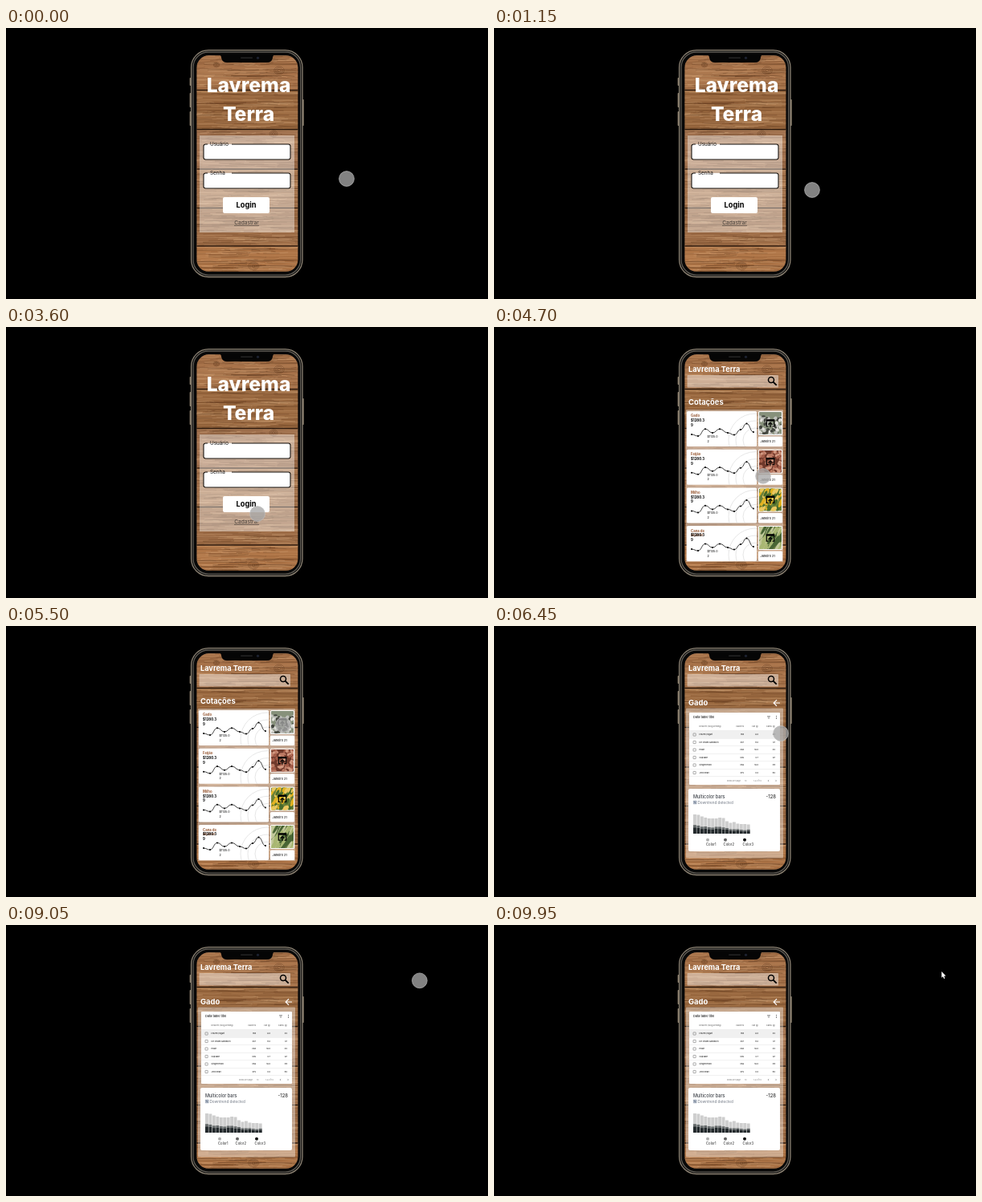
An HTML page with a canvas for the animation above (10 s loop, 600 by 338 pixels).

```html
<!DOCTYPE html>
<html lang="pt">
<head>
<meta charset="utf-8">
<title>Lavrema Terra</title>
<style>
html, body { margin: 0; width: 100%; height: 100%; overflow: hidden; background: #000; }
canvas { display: block; width: 100%; height: 100%; }
</style>
</head>
<body>
<canvas id="stage" width="600" height="338"></canvas>
<script>
const W = 600, H = 338, LOOP = 10000;
const LIST_AT = 4000, DETAIL_AT = 5700, ARROW_AT = 9100;
const stage = document.getElementById('stage').getContext('2d');
const FONT = 'Inter, "Open Sans", sans-serif';
let g;

function seeded(seed) {
  return () => (seed = (seed * 16807) % 2147483647) / 2147483647;
}

function layer(draw) {
  const canvas = document.createElement('canvas');
  canvas.width = W;
  canvas.height = H;
  g = canvas.getContext('2d');
  draw();
  return canvas;
}

function box(x, y, w, h, r, fill, stroke, line = 1) {
  g.beginPath();
  g.roundRect(x, y, w, h, r);
  if (fill) { g.fillStyle = fill; g.fill(); }
  if (stroke) { g.strokeStyle = stroke; g.lineWidth = line; g.stroke(); }
}

function dot(x, y, r, fill) {
  g.beginPath();
  g.arc(x, y, r, 0, 7);
  g.fillStyle = fill;
  g.fill();
}

function path(points, color, width) {
  g.beginPath();
  points.forEach(([x, y]) => g.lineTo(x, y));
  g.strokeStyle = color;
  g.lineWidth = width;
  g.stroke();
}

function text(str, x, y, size, color = '#000', weight = 400, align = 'left') {
  g.font = `${weight} ${size}px ${FONT}`;
  g.textAlign = align;
  g.fillStyle = color;
  g.fillText(str, x, y);
}

function clipped(x, y, w, h, r, draw) {
  g.save();
  g.beginPath();
  g.roundRect(x, y, w, h, r);
  g.clip();
  draw();
  g.restore();
}

function wood() {
  const rand = seeded(41);
  const seams = [30, 77.5, 126.5, 176, 224.5, 272, 310];
  const tones = ['#a8734a', '#99683f', '#a37350', '#a5744d', '#9c6b45', '#ae7446'];
  tones.forEach((tone, i) => {
    const top = seams[i], h = seams[i + 1] - top;
    g.fillStyle = tone;
    g.fillRect(236, top, 130, h);
    for (let n = 0; n < 150; n++) {
      const y = top + rand() * h, x = 215 + rand() * 125;
      const len = 15 + rand() * 65, bend = (rand() - 0.5) * 5;
      g.beginPath();
      g.moveTo(x, y);
      g.bezierCurveTo(x + len / 3, y + bend, x + len / 1.5, y - bend, x + len, y + bend / 2);
      g.strokeStyle = rand() < 0.48 ? 'rgba(75,40,18,.3)' : 'rgba(232,190,145,.27)';
      g.lineWidth = 0.4 + rand() * 0.8;
      g.stroke();
    }
    g.fillStyle = 'rgba(230,185,135,.3)';
    g.fillRect(236, top + 1, 130, 1);
    g.fillStyle = '#2c190d';
    g.fillRect(236, top - 0.7, 130, 1.4);
  });
  [[340, 53, 5], [262, 46, 3], [308, 297, 5], [333, 132, 4]].forEach(([x, y, r]) => {
    for (let k = 1; k <= 3; k++) {
      g.beginPath();
      g.ellipse(x, y, r * k / 2.4, r * k / 3, 0, 0, 7);
      g.strokeStyle = 'rgba(65,32,12,.4)';
      g.lineWidth = 0.7;
      g.stroke();
    }
  });
}

function phone(content) {
  g.fillStyle = '#000';
  g.fillRect(0, 0, W, H);
  [[228.6, 62, 10], [228.6, 81, 18], [228.6, 104, 18], [368.8, 89, 33]]
    .forEach(([x, y, h]) => box(x, y, 2, h, 0.8, '#857a69'));
  box(230.6, 27.6, 138.4, 282.9, 21.5, '#080808', '#8d8374', 1.3);
  box(233, 30, 133.6, 278.1, 19, null, '#5f5b54', 1.3);
  clipped(237.4, 34.3, 126, 269.5, 15, () => { wood(); content(); });
  g.beginPath();
  g.moveTo(265, 33);
  g.quadraticCurveTo(268, 34, 268, 37);
  g.quadraticCurveTo(269, 43, 275, 43);
  g.lineTo(325, 43);
  g.quadraticCurveTo(331, 43, 332, 37);
  g.quadraticCurveTo(332, 34, 335, 33);
  g.fillStyle = '#050505';
  g.fill();
  box(292, 36.5, 15, 1.6, 0.8, '#252525');
  dot(313.5, 37.3, 1.6, '#1d2230');
}

function field(label, y) {
  box(246, y, 108, 19, 2.5, '#fff', '#17130f', 1.1);
  g.fillStyle = '#fff';
  g.fillRect(251, y - 0.8, 30, 1.8);
  g.fillStyle = '#c4ab98';
  g.fillRect(251, y - 0.9, 30, 0.9);
  text(label, 254, y + 2.2, 6.3, '#111');
}

function login() {
  text('Lavrema', 302, 79.5, 24.6, '#fff', 800, 'center');
  text('Terra', 302, 116, 24.6, '#fff', 800, 'center');
  box(241, 134, 118, 121, 0, 'rgba(255,255,255,.4)');
  field('Usuário', 145);
  field('Senha', 181);
  box(270, 211, 58, 20, 2, '#fff');
  text('Login', 299, 224, 9.2, '#000', 700, 'center');
  text('Cadastrar', 299.5, 245.3, 6.6, '#443c36', 400, 'center');
  g.fillRect(284, 246.3, 31, 0.6);
}

function header(title, y) {
  text('Lavrema Terra', 242, 56, 9.2, '#fff', 700);
  box(240.5, 60, 113.5, 15.5, 1, 'rgba(255,255,255,.42)');
  g.beginPath();
  g.arc(345, 66, 3.5, 0, 7);
  g.strokeStyle = '#000';
  g.lineWidth = 1.5;
  g.stroke();
  path([[347.6, 68.6], [351.7, 72.7]], '#000', 1.8);
  text(title, 242, y, 9.4, '#fff', 700);
}

function thumbnail(kind, y) {
  const rand = seeded(kind * 97 + 13);
  const base = ['#87917b', '#6f392b', '#6b8138', '#697a42'][kind];
  const tones = [
    ['#e2e1dc', '#bfc0bb', '#444740'],
    ['#bd7b65', '#a35c48', '#d29a82'],
    ['#e2b323', '#486b2b', '#eac85f'],
    ['#a9b773', '#496535', '#c3c99b']
  ][kind];
  clipped(330, y, 28, 28, 1, () => {
    g.fillStyle = base;
    g.fillRect(330, y, 28, 28);
    for (let n = 0; n < 70; n++) {
      const x = 330 + rand() * 28, top = y + (kind ? 0 : 5) + rand() * 28;
      const long = kind === 3 ? 8 : kind === 2 ? 4 : 2.4;
      g.beginPath();
      g.ellipse(x, top, long, 1.2 + rand(), kind > 1 ? 2.1 : rand() * 3, 0, 7);
      g.fillStyle = tones[n % 3];
      g.fill();
    }
  });
}

function openIcon(y) {
  path([[341.5, y + 4], [339.3, y + 4], [339.3, y - 4], [348.7, y - 4],
    [348.7, y + 4], [346.5, y + 4]], '#000', 1.2);
  g.fillStyle = '#000';
  g.fillRect(338.8, y - 4.7, 10.4, 2.3);
  path([[344, y + 5], [344, y - 0.5]], '#000', 1.3);
  path([[341.5, y + 1.8], [344, y - 0.8], [346.5, y + 1.8]], '#000', 1.2);
}

function trend(y) {
  const p = [[246, 29], [254, 31], [263, 22.3], [272, 27], [281, 22.3],
    [291, 27], [299, 29.5], [307, 23], [314.5, 15.5], [323, 26]];
  g.beginPath();
  g.moveTo(p[0][0], y + p[0][1]);
  for (let i = 1; i < p.length; i++) {
    const [x0, y0] = p[i - 1], [x1, y1] = p[i], mid = (x0 + x1) / 2;
    g.bezierCurveTo(mid, y + y0, mid, y + y1, x1, y + y1);
  }
  g.strokeStyle = '#111';
  g.lineWidth = 0.8;
  g.stroke();
  p.forEach(([px, py]) => dot(px, y + py, 1, '#000'));
}

function quote(name, kind) {
  const y = 105 + kind * 47.7;
  box(240, y, 87, 44, 1.5, '#fff');
  clipped(240, y, 87, 44, 1.5, () => {
    [15, 24, 33].forEach(r => {
      g.beginPath();
      g.arc(325, y + 36, r, 0, 7);
      g.strokeStyle = '#d5d5d5';
      g.lineWidth = 0.6;
      g.stroke();
    });
  });
  text(name, 245, y + 7.4, 4.3, '#995a35', 700);
  if (kind === 3) text('Açúcar', 245, y + 13.2, 4.3, '#995a35', 700);
  text('$1280.3', 245, y + 13.2, 4.3, '#000', 700);
  text('9', 245, y + 19, 4.3, '#000', 700);
  trend(y);
  text('$1135.0', 265.5, y + 33, 3.6, '#222', 500);
  text('2', 265.5, y + 38.5, 3.6, '#222', 500);
  box(329, y, 30, 30, 1.5, '#fff');
  thumbnail(kind, y + 1);
  openIcon(y + 15);
  box(329, y + 31.5, 30, 12.5, 1.5, '#fff');
  text('Janeiro 21', 331.5, y + 39.3, 3.8, '#222', 500);
}

function list() {
  header('Cotações', 97);
  box(239, 103, 121, 190, 1, 'rgba(255,255,255,.38)');
  ['Gado', 'Feijão', 'Milho', 'Cana de'].forEach(quote);
}

function table() {
  box(243, 108, 113, 90, 1, '#fff');
  text('Data table title', 248, 115.3, 3.8, '#222', 500);
  [0, 1, 2].forEach(i => {
    g.fillStyle = '#555';
    g.fillRect(340 + i * 0.7, 112.5 + i * 1.2, 4 - i * 1.4, 0.6);
    dot(351.5, 112.3 + i * 1.6, 0.5, '#444');
  });
  const cells = (row, y, color) => row.forEach((cell, i) =>
    text(cell, [255.5, 311, 329, 350][i], y, 2.5, color, 500, i ? 'right' : 'left'));
  cells(['Dessert (100g serving)', 'Calories', 'Fat (g)', 'Carbs (g)'], 126.2, '#666');
  const rows = [
    ['Frozen yogurt', '159', '6.0', '24'],
    ['Ice cream sandwich', '237', '9.0', '37'],
    ['Eclair', '262', '16.0', '24'],
    ['Cupcake', '305', '3.7', '67'],
    ['Gingerbread', '356', '16.0', '49'],
    ['Jelly bean', '375', '0.0', '94']
  ];
  rows.forEach((row, i) => {
    const y = 135.5 + i * 9.5;
    g.fillStyle = i ? '#fff' : '#f0f0f0';
    g.fillRect(243, y - 4.8, 113, 9.5);
    g.fillStyle = '#e2e2e2';
    g.fillRect(243, y - 5, 113, 0.5);
    box(248, y - 1.6, 3.2, 3.2, 0.3, null, '#777', 0.6);
    cells(row, y + 0.9, '#222');
  });
  g.fillStyle = '#e2e2e2';
  g.fillRect(243, 187.5, 113, 0.5);
  text('Rows per page:', 290, 194, 2.4, '#777');
  text('10', 312, 194, 2.4, '#777');
  text('1-6 of 13', 323, 194, 2.4, '#777');
  path([[342, 191.9], [341, 193], [342, 194.1]], '#555', 0.5);
  path([[350.5, 191.9], [351.5, 193], [350.5, 194.1]], '#555', 0.5);
}

function bars() {
  box(242, 203, 114, 78, 2, '#fff');
  text('Multicolor bars', 248, 214.5, 5.5, '#3d4148', 500);
  text('-128', 351, 214.5, 5.9, '#333', 500, 'right');
  box(248, 217.7, 4.4, 4.5, 0.5, '#a7b0bf');
  path([[249, 218.8], [250.2, 220.2], [251.4, 221.2]], '#556579', 0.6);
  text('Downtrend detected', 253.5, 222, 4.6, '#737a86');
  const heights = [24, 23.5, 21.5, 20, 19, 19, 19, 20, 19.5, 15.5, 13.5, 14.5, 12.5, 12, 12, 11.5];
  heights.forEach((h, i) => {
    const x = 248 + i * 4.45;
    const dark = h * 0.32 - (i % 3) * 0.5, mid = h * 0.13;
    g.fillStyle = '#cecece';
    g.fillRect(x, 259 - h, 3.9, h);
    g.fillStyle = '#666b6c';
    g.fillRect(x, 259 - dark - mid, 3.9, mid);
    g.fillStyle = '#22282b';
    g.fillRect(x, 259 - dark, 3.9, dark);
  });
  ['#b0b0b0', '#666', '#161616'].forEach((tone, i) => {
    const x = [266, 288, 312][i];
    dot(x, 266.8, 2, tone);
    text('Color' + (i + 1), x + 4.3, 274.2, 4.2, '#444', 500, 'center');
  });
}

function detail() {
  header('Gado', 99);
  path([[356, 96], [348.5, 96]], '#fff', 1.2);
  path([[352, 92.2], [348.2, 96], [352, 99.8]], '#fff', 1.2);
  box(239, 102.5, 121, 187, 1, 'rgba(255,255,255,.38)');
  table();
  bars();
}

const screens = [login, list, detail].map(screen => layer(() => phone(screen)));
g = stage;

// Each stop is [time, x, y].
const route = [
  [0, 424, 188], [1050, 402, 199], [1150, 396, 202], [2100, 389, 206],
  [3600, 313, 233], [4000, 310, 224], [4700, 335, 186], [5400, 345, 124],
  [5700, 345, 122], [6450, 357, 134], [7350, 362, 116], [7900, 364.5, 108],
  [8450, 365, 107], [9200, 552, 60], [LOOP, 557.5, 58]
];

function pointerAt(t) {
  const i = route.findIndex(stop => stop[0] > t);
  const [t0, x0, y0] = route[i - 1], [t1, x1, y1] = route[i];
  const k = (t - t0) / (t1 - t0);
  return [x0 + (x1 - x0) * k, y0 + (y1 - y0) * k];
}

function pointer(t) {
  const [x, y] = pointerAt(t);
  if (t >= ARROW_AT) {
    g.beginPath();
    [[0, 0], [0, 7.6], [1.7, 6.1], [2.9, 8.9], [4.2, 8.3], [3, 5.6], [5.3, 5.5]]
      .forEach(([dx, dy]) => g.lineTo(x + dx, y + dy));
    g.closePath();
    g.fillStyle = '#fff';
    g.fill();
    return;
  }
  dot(x, y, 9.4, 'rgba(166,166,166,.78)');
  g.strokeStyle = 'rgba(190,190,190,.75)';
  g.lineWidth = 0.9;
  g.stroke();
}

function frame(now) {
  const t = now % LOOP;
  g.drawImage(screens[t < LIST_AT ? 0 : t < DETAIL_AT ? 1 : 2], 0, 0);
  pointer(t);
  requestAnimationFrame(frame);
}
requestAnimationFrame(frame);
</script>
</body>
</html>
```
